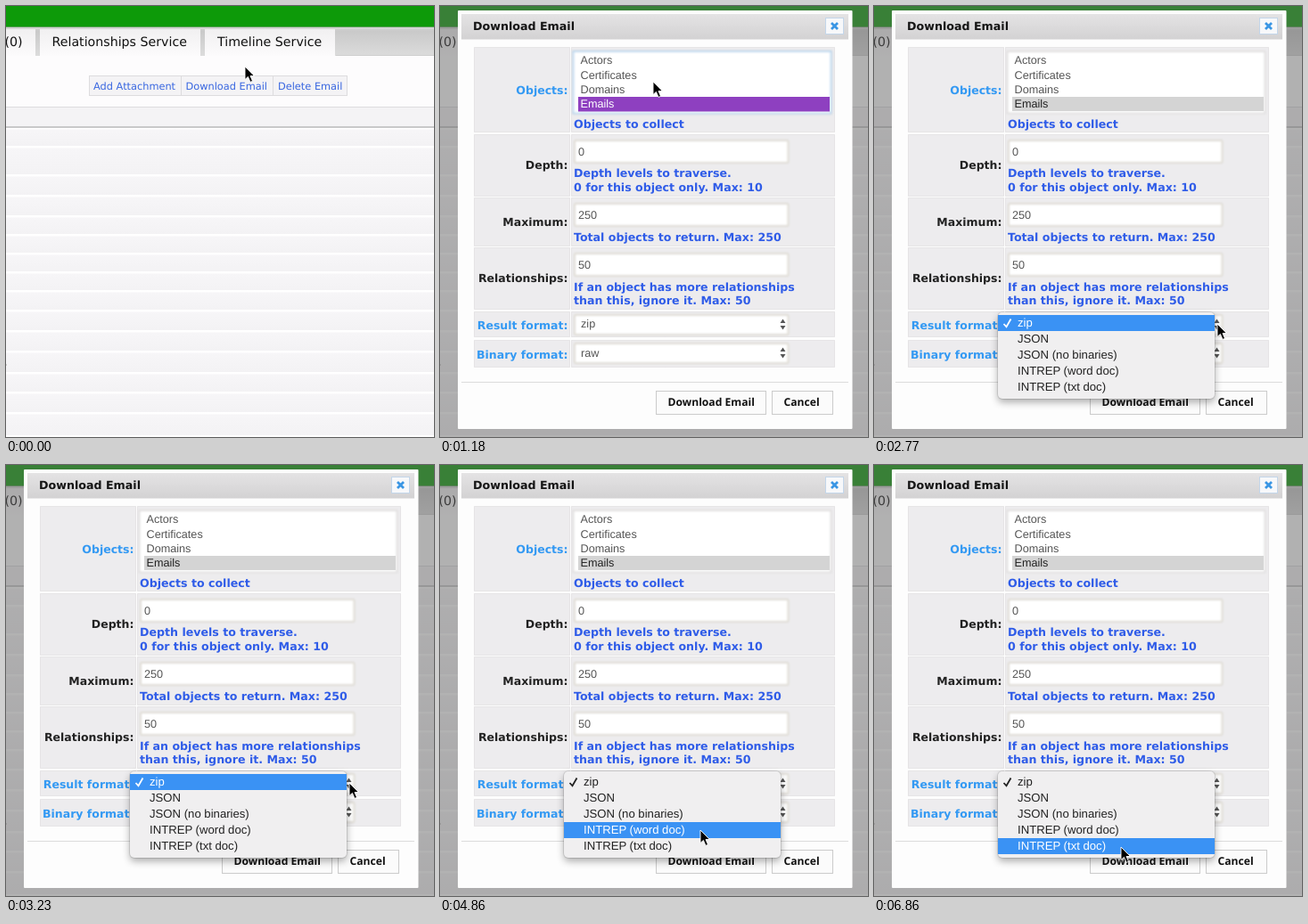
An HTML page for the animation above (6900 ms loop, 480 by 484 pixels).

```html
<!DOCTYPE html>
<html lang="en">
<head>
<meta charset="utf-8">
<title>Download Email</title>
<style>
html, body { margin: 0; width: 100%; height: 100%; overflow: hidden; background: #fff; }
#stage { position: relative; width: 480px; height: 484px; overflow: hidden; }
svg { position: absolute; left: 0; top: 0; display: block; overflow: hidden; text-rendering: geometricPrecision; }

.wide { font-family: "DejaVu Sans", sans-serif; }
.tab { font-size: 14.2px; fill: #111; }
.link { font-size: 11.35px; fill: #3866e0; }
.title { font: bold 12.66px "DejaVu Sans", sans-serif; fill: #151515; }
.label { font: bold 12.5px "DejaVu Sans", sans-serif; text-anchor: end; fill: #222; }
.help { font: bold 12.6px "DejaVu Sans", sans-serif; fill: #2f5ce8; }
.opt { fill: #3399f3; }
.value { font: 12.65px "Liberation Sans", sans-serif; fill: #555; }
.push { font: bold 12.15px "Open Sans", sans-serif; fill: #111; }
.cell { fill: #edecee; stroke: #d6d5d7; stroke-dasharray: 1 1; }
.field { fill: #fff; stroke: #dfdcd4; stroke-width: 2; filter: url(#soft); }
.button { fill: #fbfbfb; stroke: #cbcbcb; }

/* One shared clock: 1% is 69 ms */
.anim { animation: 6.9s step-end infinite; }
#hover { animation-name: hover; }
#modal { animation-name: modal; }
.focus { animation-name: focus; }
#blur, #menu { animation-name: blur; }
#arrow { animation-name: arrow; }
#beam { animation-name: beam; }
#hot { animation-name: pick; }
#pointer { animation: travel 6.9s ease-in-out infinite; }

@keyframes hover { 0% { opacity: 0 } 5.8%, 100% { opacity: 1 } }
@keyframes modal { 0% { opacity: 0 } 14.5%, 100% { opacity: 1 } }
@keyframes focus { 0% { opacity: 1 } 39.9%, 100% { opacity: 0 } }
@keyframes blur { 0% { opacity: 0 } 39.9%, 100% { opacity: 1 } }
@keyframes arrow { 0% { opacity: 1 } 22.6% { opacity: 0 } 36.2%, 100% { opacity: 1 } }
@keyframes beam { 0% { opacity: 0 } 22.6% { opacity: 1 } 36.2%, 100% { opacity: 0 } }
@keyframes pick {
  0% { clip-path: inset(0 0 72px 0) }
  49.7% { clip-path: inset(18px 0 54px 0) }
  51.1% { clip-path: inset(36px 0 36px 0) }
  52.8% { clip-path: inset(54px 0 18px 0) }
  74%, 100% { clip-path: inset(72px 0 0 0) }
}
@keyframes travel {
  0%, 2.2% { transform: translate(268px, 68px) }
  9.4%, 18.1% { transform: translate(239px, 85px) }
  30.9%, 32.3% { transform: translate(334px, 301.5px) }
  38.4%, 48.3% { transform: translate(385px, 357px) }
  53.6% { transform: translate(350px, 403px) }
  63.8% { transform: translate(300px, 410px) }
  68.1%, 71% { transform: translate(292px, 410px) }
  77.5%, 100% { transform: translate(277px, 429px) }
}

#menu {
  position: absolute; left: 139px; top: 343.5px; width: 243px; height: 97px;
  border-radius: 5px; background: #f0eff0;
  box-shadow: 0 0 0 1px rgba(0,0,0,.1), 0 4px 9px rgba(0,0,0,.32);
}
.list {
  position: absolute; left: 0; top: 3.5px; width: 221px; height: 90px; padding-left: 22px;
  font: 13.15px/18px "Liberation Sans", sans-serif; color: #222;
  text-rendering: geometricPrecision;
}
.list svg { left: 5px; top: 3px; }
#hot { background: #3a92f4; color: #fff; }
</style>
</head>
<body>
<div id="stage">
  <svg width="480" height="484">
    <defs>
      <linearGradient id="strip" x2="0" y2="1">
        <stop offset="0" stop-color="#dedede"/><stop offset=".15" stop-color="#c9c9c9"/>
        <stop offset="1" stop-color="#dcdcdc"/>
      </linearGradient>
      <linearGradient id="tab" x2="0" y2="1">
        <stop offset="0" stop-color="#f1f0f1"/><stop offset="1" stop-color="#fcfbfc"/>
      </linearGradient>
      <linearGradient id="row" x2="0" y2="1">
        <stop offset="0" stop-color="#f7f6f8"/><stop offset="1" stop-color="#f3f2f4"/>
      </linearGradient>
      <linearGradient id="bar" x2="0" y2="1">
        <stop offset="0" stop-color="#e4e3e4"/><stop offset="1" stop-color="#d3d2d3"/>
      </linearGradient>
      <filter id="soft" x="-5%" y="-20%" width="110%" height="140%"><feGaussianBlur stdDeviation=".9"/></filter>
    </defs>

    <rect width="480" height="484" fill="#fdfcfd"/>
    <rect y="23" width="480" height="33" fill="url(#strip)"/>
    <rect width="480" height="23" fill="#0d9a09"/>
    <rect y="23" width="480" height="1" fill="#5f9f5d"/>
    <g fill="url(#tab)">
      <rect x="-10" y="26" width="43" height="30"/>
      <rect x="38" y="26" width="180" height="30"/>
      <rect x="223" y="26" width="146" height="30"/>
    </g>
    <path d="M370 55.5H480" stroke="#cfcfcf"/>
    <g class="wide tab">
      <text x="18.5" y="45" text-anchor="end">(0)</text>
      <text x="51.5" y="45">Relationships Service</text>
      <text x="237" y="45">Timeline Service</text>
    </g>

    <rect x="93.5" y="78.5" width="289" height="22" fill="#f4f3f5" stroke="#dddcde"/>
    <rect id="hover" class="anim" x="197" y="79" width="102" height="21" fill="#d9d8da"/>
    <path d="M196.5 79V100M299.5 79V100" stroke="#dddcde"/>
    <g class="wide link">
      <text x="98" y="94">Add Attachment</text>
      <text x="201.5" y="94">Download Email</text>
      <text x="305" y="94">Delete Email</text>
    </g>

    <rect y="113" width="480" height="23" fill="#f4f3f5"/>
    <path d="M0 113.5H480" stroke="#dddcde"/>
    <g id="rows"></g>
    <path d="M0 136H480" stroke="#b9b8ba" stroke-width="1.4"/>
    <rect y="402" width="1" height="2" fill="#ccc"/>

    <g id="modal" class="anim">
      <rect width="480" height="484" fill="#666" opacity=".5"/>
      <rect x="20" y="5" width="442.5" height="470" rx="1" fill="#fdfdfd"/>
      <rect x="24" y="9" width="434" height="28.5" fill="url(#bar)"/>
      <text class="title" x="37" y="27">Download Email</text>
      <rect x="432.5" y="13.5" width="20" height="18" fill="#f7f8fa" stroke="#c3d6ea"/>
      <path d="M439 19l7 7M446 19l-7 7" stroke="#3a96e4" stroke-width="2.8"/>

      <g id="cells"></g>

      <rect class="field" x="149.5" y="51" width="289" height="69.5" style="stroke:#e2e0e0"/>
      <rect class="field anim focus" x="149.5" y="51" width="289" height="69.5" style="stroke:#bcd8f0"/>
      <g class="value">
        <text x="157.5" y="65">Actors</text>
        <text x="157.5" y="81.5">Certificates</text>
        <text x="157.5" y="97.5">Domains</text>
      </g>
      <g id="blur" class="anim">
        <rect x="155" y="102" width="282" height="16" fill="#d4d4d4"/>
        <text class="value" x="157.5" y="114" style="fill:#222">Emails</text>
      </g>
      <g class="anim focus">
        <rect x="155" y="102" width="282" height="16.5" fill="#8e40c0"/>
        <text class="value" x="157.5" y="114" style="fill:#fff">Emails</text>
      </g>

      <g id="fields"></g>

      <g class="help">
        <text x="150" y="136.5">Objects to collect</text>
        <text x="150" y="192">Depth levels to traverse.</text>
        <text x="150" y="207.5">0 for this object only. Max: 10</text>
        <text x="150" y="264">Total objects to return. Max: 250</text>
        <text x="150" y="319.5">If an object has more relationships</text>
        <text x="150" y="335">than this, ignore it. Max: 50</text>
      </g>

      <path d="M24 422.5H458" stroke="#dcdcdc"/>
      <rect class="button" x="242.5" y="432.5" width="123" height="26"/>
      <rect class="button" x="372.5" y="432.5" width="68" height="26"/>
      <text class="push" x="255.5" y="449">Download Email</text>
      <text class="push" x="385.5" y="449">Cancel</text>
    </g>
  </svg>

  <div id="menu" class="anim">
    <div class="list" id="plain">
      <svg width="12" height="12"><path d="M1.5 7L4.5 10.3L9.5 1.5" fill="none" stroke="currentColor" stroke-width="1.8"/></svg>
      <div>zip</div><div>JSON</div><div>JSON (no binaries)</div><div>INTREP (word doc)</div><div>INTREP (txt doc)</div>
    </div>
  </div>

  <svg width="480" height="484">
    <g id="pointer">
      <path id="arrow" class="anim" d="M0 0V14.5L3.4 11.4L6 17.4L8.5 16.3L6 10.5H10.5Z" fill="#000" stroke="#fff" stroke-width=".9"/>
      <g id="beam" class="anim" fill="none">
        <path d="M-4 -7.5Q0 -7.5 0 -5Q0 -7.5 4 -7.5M0 -5V6M-4 8Q0 8 0 5.5Q0 8 4 8M-2 3H2" stroke="#fff" stroke-width="3" opacity=".7"/>
        <path d="M-4 -7.5Q0 -7.5 0 -5Q0 -7.5 4 -7.5M0 -5V6M-4 8Q0 8 0 5.5Q0 8 4 8M-2 3H2" stroke="#222" stroke-width="1.3"/>
      </g>
    </g>
  </svg>
</div>
<script>
const fill = (id, parts) => { document.getElementById(id).innerHTML = parts.join(""); };

// Table rows of the page, split by white rules
const rules = [137, 158, 190, 213, 236, 257, 278, 299, 320, 342, 365, 388, 412, 434, 457, 483];
fill("rows", rules.map((y, i) => {
  const h = (rules[i + 1] || 506) - y;
  return `<rect y="${y}" width="480" height="${h}" fill="url(#row)"/>
    <rect y="${y - 1}" width="480" height="2.4" fill="#fff"/>`;
}));

// Form rows: top, bottom, label, label baseline, class
const form = [
  [46, 142, "Objects:", 99, "opt"],
  [144, 214, "Depth:", 183, ""],
  [215, 270, "Maximum:", 247, ""],
  [271, 341, "Relationships:", 310, ""],
  [343, 372, "Result format:", 363, "opt"],
  [375, 406, "Binary format:", 395.5, "opt"]
];
const cell = (x, w, top, bottom) =>
  `<rect class="cell" x="${x}.5" y="${top}.5" width="${w}" height="${bottom - top - 1}"/>`;
fill("cells", form.map(([top, bottom, name, y, kind]) =>
  cell(38, 107, top, bottom) + cell(147, 295, top, bottom) +
  `<text class="label ${kind}" x="143.5" y="${y}">${name}</text>`));

// Inputs and selects: top, height, value, baseline, is select
const fields = [
  [150, 26, "0", 167.5], [221, 26, "250", 239], [277, 26, "50", 294.5],
  [346, 23, "zip", 361, true], [378, 23, "raw", 393.5, true]
];
fill("fields", fields.map(([y, h, value, base, select]) => {
  const mid = y + h / 2;
  const arrows = `<path d="M381.5 ${mid - 1.5}l3-4.5l3 4.5zM381.5 ${mid + 1.5}l3 4.5l3-4.5z" fill="#555"/>`;
  return `<rect class="field" x="151" y="${y + 1}" width="239.5" height="${h - 1}" rx="1"/>
    <text class="value" x="${select ? 158 : 155}" y="${base}">${value}</text>${select ? arrows : ""}`;
}));

// Highlighted copy of the menu, shown one row at a time
const hot = document.getElementById("plain").cloneNode(true);
hot.id = "hot";
hot.classList.add("anim");
document.getElementById("menu").append(hot);
</script>
</body>
</html>
```
